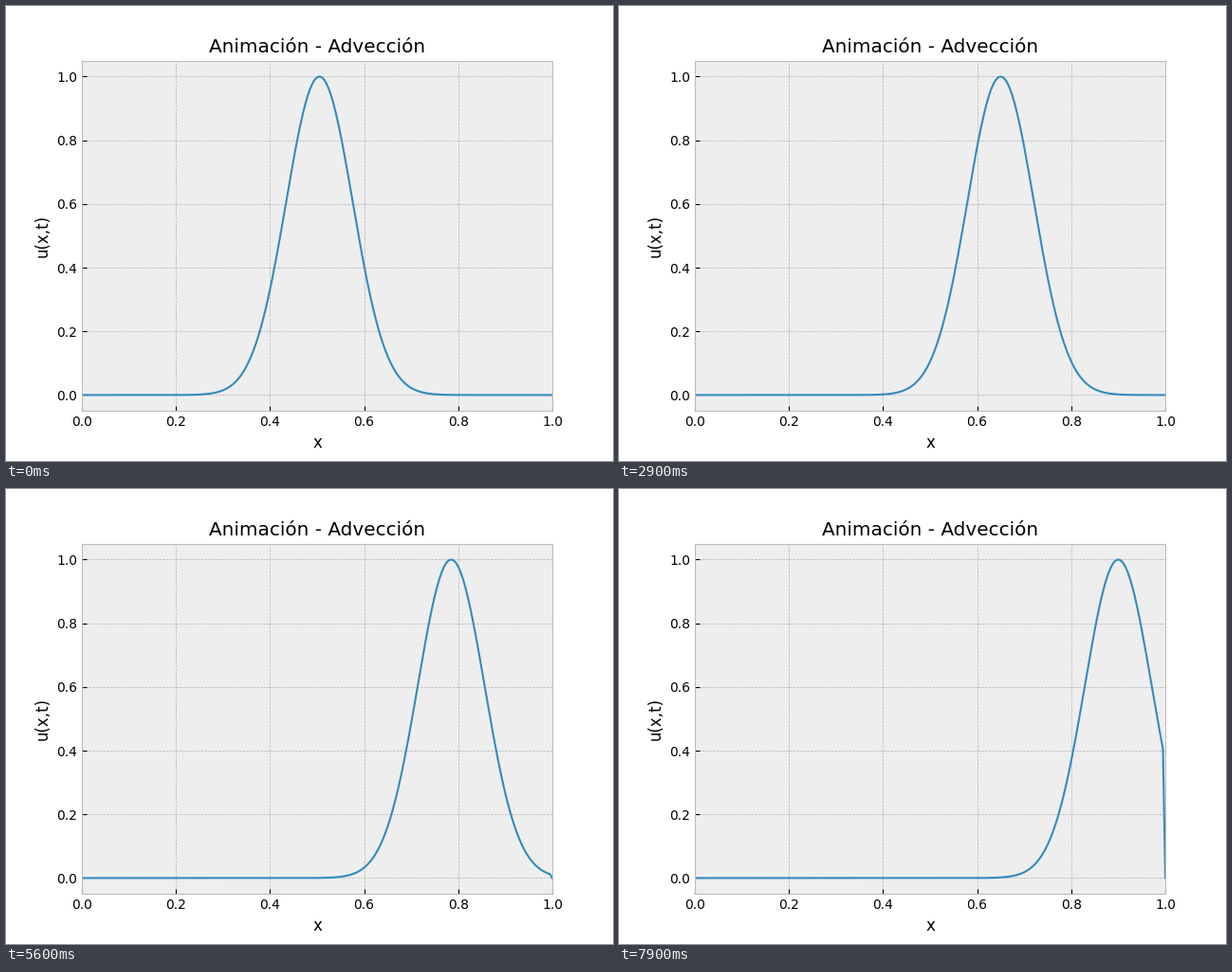
Animation of 640 by 480 pixels, one loop 8000 ms. Source, as a matplotlib script:

```python
import numpy as np
import matplotlib.pyplot as plt
from matplotlib.animation import FuncAnimation

FRAMES = 80
INTERVAL = 100  # ms
CELLS = 200
START = 0.505

plt.style.use("bmh")
plt.rcParams["font.family"] = "DejaVu Sans"

dx = 1 / CELLS
x = np.linspace(0, 1, CELLS + 1)


def wave(step):
    """Gaussian pulse carried one cell per step, held at zero on both ends."""
    u = np.exp(-100 * (x - START - step * dx) ** 2)
    u[0] = u[-1] = 0
    return u


fig, ax = plt.subplots(figsize=(6.4, 4.8), dpi=100)
line, = ax.plot(x, wave(0), color="#348ABD", linewidth=1.5)
ax.set_xlim(0, 1)
ax.set_ylim(-0.05, 1.05)
ax.set_title("Animación - Advección")
ax.set_xlabel("x")
ax.set_ylabel("u(x,t)")


def update(step):
    line.set_ydata(wave(step))
    return line,


anim = FuncAnimation(fig, update, frames=FRAMES, interval=INTERVAL,
                     repeat=True, repeat_delay=0)
plt.show()
```
